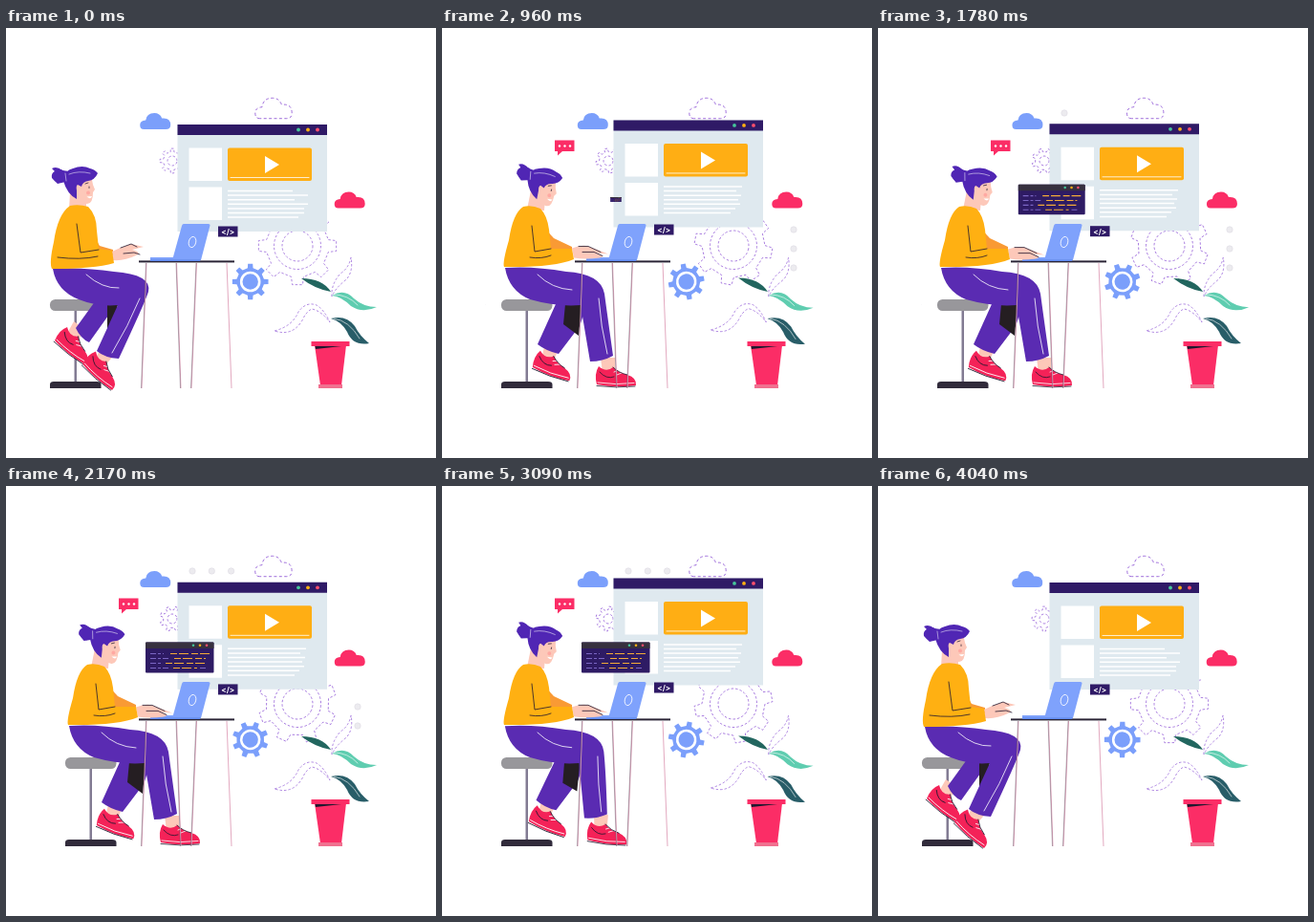
An HTML page for the animation above (4.08 s loop, 450 px wide and 450 px high).

```html
<!DOCTYPE html>
<html lang="en">
<head>
<meta charset="utf-8">
<title>Developer at work</title>
<style>
html, body { margin: 0; width: 100%; height: 100%; overflow: hidden; background: #fff; }
svg { display: block; width: 100vw; height: 100vh; }
.hair { fill: #5026b4; }
.skin { fill: #fdc8b9; }
.pants { fill: #5a2bb2; }
.shirt { fill: #ffb012; }
.pink { fill: #fb2d66; }
.dark { fill: #2f1a66; }
.ink { fill: none; stroke: #21182f; stroke-width: .8; stroke-linecap: round; stroke-linejoin: round; }
.white { fill: none; stroke: #fff; stroke-width: .8; stroke-linecap: round; }
.faint { fill: #fff; stroke: #8f56d6; stroke-width: .7; stroke-dasharray: 2.5 2; }
.dot { fill: #ecebef; stroke: #dddbe2; stroke-width: .6; }
</style>
</head>
<body>
<svg viewBox="0 0 450 450">
  <defs>
    <path id="cloud" d="M-12 8.5Q-16 8.5-16 4Q-16-.5-10-1Q-9-8.5-1-8.5Q5-8.5 7-3Q16-4 16 4Q16 8.5 11 8.5Z"/>
    <g id="shoe">
      <path class="skin" d="M-16-18H-1V-2H-14Z"/>
      <path fill="#f42258" d="M-20 10Q-23-1-18-9Q-10-2-3-8Q3-2 12 0Q22 3 21 11Q0 14-20 10Z"/>
      <path class="white" d="M-19 8Q0 11 19 8.500M-2-3L3-5M1 0L6-2"/>
      <path class="ink" d="M-20 11.500Q0 14 20 12M-17-3Q-10 5-2 2M-3-8Q3-2 12 0"/>
    </g>
  </defs>

  <path id="gearS" class="faint"/>
  <g id="gearL" class="faint"><path/><circle r="24.500"/><circle r="16"/></g>
  <g id="gearB"><path fill="#7b9ffb"/><circle r="9.500" fill="none" stroke="#fff" stroke-width="2.600"/></g>

  <use id="cloudB" href="#cloud" fill="#7b9ffb"/>
  <use id="cloudW" href="#cloud" class="faint"/>
  <use id="cloudP" href="#cloud" class="pink"/>

  <g id="page">
    <path fill="#dfe9ef" d="M179.500 101H336V213H179.500Z"/>
    <path class="dark" d="M179.500 101H336V112H179.500Z"/>
    <circle cx="306" cy="106.500" r="1.900" fill="#45c69a"/>
    <circle cx="316" cy="106.500" r="1.900" fill="#ffb012"/>
    <circle cx="326" cy="106.500" r="1.900" fill="#ff4f6d"/>
    <path fill="#fff" d="M191.500 125.500H226V160H191.500ZM191.500 166.500H226V201H191.500Z"/>
    <rect x="232" y="125.500" width="88" height="34.500" rx="2" fill="#ffae14"/>
    <path fill="#fff" d="M271 134L286 143L271 152Z"/>
    <path class="white" d="M235 156.500H317"/>
    <path id="lines" class="white" style="stroke-width:1.500;stroke-linecap:butt"/>
  </g>
  <g id="chip">
    <rect x="222" y="207.500" width="20.500" height="11" class="dark"/>
    <text x="232.200" y="216" text-anchor="middle" font-family="Inter, sans-serif" font-size="8" font-weight="700" fill="#fff">&lt;/&gt;</text>
  </g>
  <g id="editor">
    <rect x="146" y="163.500" width="71.500" height="32" rx="1" fill="#2e1b64"/>
    <path fill="#37313f" d="M146 170V164.500Q146 163.500 147 163.500H216.500Q217.500 163.500 217.500 164.500V170Z"/>
    <circle cx="196" cy="166.800" r="1.300" fill="#45c69a"/>
    <circle cx="203" cy="166.800" r="1.300" fill="#ffb012"/>
    <circle cx="210" cy="166.800" r="1.300" fill="#ff4f6d"/>
    <g fill="none" stroke-width="1.200">
      <path stroke="#f3ab38" stroke-dasharray="7 2 10 3" d="M172 175.500H213M176 180.500H209M167 185.500H211M175 190.500H200"/>
      <path stroke="#7b66c4" stroke-dasharray="6 2 3 2" d="M151 175.500H165M151 180.500H170M151 185.500H163M151 190.500H170M203 190.500H210"/>
    </g>
  </g>
  <g id="bubble">
    <path class="pink" d="M118 117.500H138.500V129H126L121 133.500V129H118Z"/>
    <g id="bubbleDots" fill="#fff"><circle cx="123" cy="123.500" r="1.200"/><circle cx="128.500" cy="123.500" r="1.200"/><circle cx="134" cy="123.500" r="1.200"/></g>
  </g>
  <g id="dots"></g>

  <g id="plant">
    <path class="faint" d="M281 317Q300 312 306 297Q314 286 325 290Q333 295 339 308Q330 296 320 294Q314 297 310 306Q300 323 281 317Z"/>
    <path class="faint" d="M341 281Q340 268 350 257Q359 251 361 240Q364 257 354 265Q345 272 341 281Z"/>
    <path fill="#22665f" d="M309 262Q331 262 340 276Q323 273 309 262Z"/>
    <path fill="#5fcdb0" d="M341 280Q354 272 364 283Q374 292 388 292Q373 299 361 291Q351 281 341 280Z"/>
    <path fill="#285d68" d="M340 304Q356 300 365 312Q370 322 380 330Q363 333 357 318Q351 307 340 304Z"/>
    <path class="white" style="stroke-width:.6" d="M343 279Q358 279 368 290M343 304Q359 306 370 325"/>
  </g>
  <path class="pink" d="M323 332H356L351 374H329Z"/>
  <path fill="#21182f" d="M323.500 333H351L324 336Z"/>
  <rect x="319.500" y="328" width="40" height="5" class="pink"/>
  <rect x="327" y="373" width="25" height="4" fill="#f0708f"/>

  <g id="stool">
    <rect x="71.500" y="294" width="2.500" height="78" fill="#827b93"/>
    <rect x="46" y="284" width="53.500" height="12" rx="5.500" fill="#98979b"/>
    <path fill="#312b3b" d="M46 377V373Q46 370 50 370H95Q99.500 370 99.500 373V377Z"/>
  </g>
  <use id="shoeFar" href="#shoe"/>
  <path id="legFar" class="pants"/>
  <path id="shade" fill="#251e22"/>
  <use id="shoeNear" href="#shoe"/>
  <path id="legNear" class="pants"/>
  <path id="seam" class="white"/>

  <path fill="none" stroke="#e3a9c0" d="M147 246L142 377M178.500 246L183 377M199.500 246L194 377M231 246L236 377"/>
  <path fill="none" stroke="#4a3d50" stroke-width=".4" d="M146.500 246L141.500 377M178 246L182.500 377M199 246L193.500 377"/>
  <rect x="139" y="243.400" width="100" height="2" fill="#2a2435"/>
  <path fill="#7fa2fc" d="M186 205H211.500Q214 205 213.400 207L204 243H174L184 207Q184.500 205 186 205ZM151 240H176V244H151Z"/>
  <path fill="#5f89ee" d="M151 242.500H203.500L203 244H151Z"/>
  <ellipse cx="195" cy="224" rx="3.700" ry="5.700" transform="rotate(14 195 224)" fill="none" stroke="#fff" stroke-width=".8"/>

  <path id="sleeve" fill="#f99a34"/>
  <g id="hands"><path id="hand" class="skin"/><path id="fingers" class="ink"/></g>
  <path id="neck" class="skin"/>
  <path id="torso" class="shirt"/>
  <path id="folds" class="ink"/>
  <g id="head">
    <path class="skin" d="M70 162L89 154L91 164L93 169L91 172Q91 184 85 184Q77 183 71 179Z"/>
    <circle cx="86" cy="172.500" r="2" fill="#ffa9a2"/>
    <path fill="#fff" d="M84.500 176.500L90 176Q89 180 84.500 176.500Z"/>
    <path class="ink" style="stroke-width:.7" d="M83 163L86 162M87 166V167.500"/>
    <path class="hair" d="M60 160Q61 149 70 147Q80 143 88 147Q93 148 96 152Q93 159 86 160Q80 161 79 166L75 164Q73 165 74 170L74 179Q64 174 60 160Z"/>
    <circle cx="56" cy="155" r="7" class="hair"/>
    <path class="hair" d="M59 149Q53 144 48 147L51 150Q47 152 48 157L54 163L66 160V150Z"/>
    <path class="white" style="stroke-width:.5" d="M66 153Q76 149 88 152M62 152L63 160"/>
    <path class="skin" d="M74 165Q79 165 78 171Q75 172 74 168Z"/>
  </g>
</svg>
<script>
const LOOP = 4080;
const el = id => document.getElementById(id);
const set = (id, name, value) => el(id).setAttribute(name, value);
const move = (id, value) => set(id, 'transform', value);
const clamp = x => Math.min(1, Math.max(0, x));
const ease = u => u < .5 ? 4 * u ** 3 : 1 - 4 * (1 - u) ** 3;
const ramp = (t, a, b) => ease(clamp((t - a) / (b - a)));
const hold = (t, a, b, c, d) => ramp(t, a, b) - ramp(t, c, d);
const lerp = (a, b, k) => a + (b - a) * k;

// Blends two paths that share the same commands.
function blend([from, to], k) {
  const goal = to.match(/-?[\d.]+/g);
  let i = 0;
  return from.replace(/-?[\d.]+/g, n => lerp(+n, +goal[i++], k).toFixed(2));
}

function gear(outer, inner) {
  const points = [];
  for (let i = 0; i < 8; i++)
    for (const [r, turn] of [[inner, -.25], [outer, -.17], [outer, .17], [inner, .25]]) {
      const a = (i + turn) * Math.PI / 4;
      points.push((r * Math.cos(a)).toFixed(2) + ' ' + (r * Math.sin(a)).toFixed(2));
    }
  return 'M' + points.join('L') + 'Z';
}

// Each pair: leaning back, then reaching for the keyboard.
const legs = {
  legFar: ['M78 262L125 262Q128 285 112 294L87 329Q78 325 73 314L94 285Z',
           'M94 262L150 262Q154 285 144 312L122 341Q109 338 100 331L119 289Z'],
  shade: ['M106 290L117 288L115 304L106 315Z',
          'M129 289L146 289L143 322L127 310Z'],
  legNear: ['M49 252Q80 250 113 255Q153 258 149 276Q146 286 118 346Q103 345 95 338L117 290Q96 292 76 284Q53 275 49 252Z',
            'M66 251Q96 249 130 255Q166 257 170 278Q173 300 179 343Q168 349 155 349L145 290Q120 292 92 284Q70 275 66 251Z'],
  seam: ['M84 258Q101 273 118 272M140 283Q128 312 111 340', 'M100 258Q115 273 136 274M164 283Q166 312 173 341']
};
const body = {
  sleeve: ['M90 214L98 228L112 232L112 238L90 238Z', 'M106 208L117 220L136 229L136 236L108 236Z'],
  neck: ['M67 172L84 178L84 190L66 190Z', 'M93 170L108 178L107 191L89 190Z'],
  torso: ['M67 186Q76 184 86 187Q95 196 95 212L97 231L111 233L113 246Q92 252 48 252Q45 246 50 224Q54 195 67 186Z',
          'M85 187Q94 185 103 189Q110 196 112 211L114 231L136 231L138 242Q116 251 65 250Q63 246 70 222Q74 194 85 187Z'],
  folds: ['M74 205L78 235L97 232M54 240Q78 243 96 239', 'M94 207L97 234L114 231M92 240Q104 242 114 238'],
  hand: ['M111 234Q121 229 131 226L144 229L132 232Q143 235 136 238Q124 244 112 243Z',
         'M136 231Q146 227 153 229L174 237L160 236Q173 239 165 241Q150 243 138 241Z'],
  fingers: ['M120 230L131 226L137 229M123 236L134 235L140 237', 'M143 229L153 229L166 235M147 235L159 235L168 239']
};
const rows = [[68, 82], [84, 76], [70, 81], [84, 78], [80, 80], [80, 75], [74, 70]];

const dots = [];
function addDot(x, y, ...times) {
  const c = document.createElementNS('http://www.w3.org/2000/svg', 'circle');
  c.setAttribute('class', 'dot');
  c.setAttribute('cx', x);
  c.setAttribute('cy', y);
  el('dots').append(c);
  dots.push([c, times]);
}
for (let i = 0; i < 3; i++) {
  addDot(368, 211 + 20 * i, 180 + 170 * i, 360 + 170 * i, 1950 + 280 * i, 2130 + 280 * i);
  addDot(195 + 20.3 * i, 89, 1600 + 170 * i, 1780 + 170 * i, 3740 - 180 * i, 3860 - 180 * i);
}

set('gearS', 'd', gear(13, 9.5) + 'M5 0A5 5 0 1 0-5 0A5 5 0 1 0 5 0Z');
el('gearL').firstChild.setAttribute('d', gear(41, 33));
el('gearB').firstChild.setAttribute('d', gear(19, 14.5));

function draw(t) {
  const c = Math.cos(t / LOOP * 4 * Math.PI);
  const lean = hold(t, 60, 620, 3180, 3880);
  const reach = hold(t, 90, 660, 2870, 3550);
  const slide = 16 * lean;
  const spin = t / LOOP * 45;

  move('page', `translate(0 ${2.3 * c - 2.3})`);
  move('chip', `translate(0 ${c - 1})`);
  move('cloudB', `translate(${157 - .8 * c} 97.500)`);
  move('cloudW', `translate(${279 + c} 84) scale(1.2 1.26)`);
  move('cloudP', `translate(${360.5 - .8 * c} 180)`);
  move('gearS', `translate(174 139) rotate(${-spin})`);
  move('gearL', `translate(305 228) rotate(${spin})`);
  move('gearB', `translate(255.700 265.500) rotate(${-spin})`);
  move('plant', `rotate(${.5 - .5 * c} 340 327)`);
  set('lines', 'd', rows.map(([a, b], i) =>
    `M232 ${170.5 + i * 4.6}h${lerp(a, b, lean)}`).join(''));

  move('stool', `translate(${slide} 0)`);
  for (const id in legs) {
    set(id, 'd', blend(legs[id], reach));
    move(id, `translate(${slide - 16 * reach} 0)`);
  }
  const shoe = (id, x, y, a, x2, y2, a2) => move(id,
    `translate(${lerp(x, x2 - 16, reach) + slide} ${lerp(y, y2, reach)}) rotate(${lerp(a, a2, reach)})`);
  shoe('shoeFar', 73, 331, 37, 117, 352, 19);
  shoe('shoeNear', 102, 357, 40, 182, 363, 0);

  for (const id in body) set(id, 'd', blend(body[id], lean));
  move('hands', `translate(0 ${.6 * Math.sin(t / LOOP * 24 * Math.PI) * lean})`);
  move('head', `translate(${26.5 * lean} ${1.5 * lean}) rotate(${lean * (8.5 - 3 * c)} 80 172)`);

  const pop = hold(t, 280, 470, 3340, 3570);
  move('bubble', `translate(118 133) scale(${pop}) translate(-118 -133)`);
  set('bubbleDots', 'opacity', hold(t, 520, 760, 3200, 3350));
  const grow = .96 * ramp(t, 780, 1300) + .04 * ramp(t, 1300, 2300) - ramp(t, 3540, 3920);
  move('editor', `translate(182 179.500) scale(${Math.max(0, grow)}) translate(-182 -179.500)`);
  for (const [dot, times] of dots) {
    const size = hold(t, ...times);
    dot.setAttribute('r', 3.2 * size);
    dot.setAttribute('opacity', size);
  }
}

const start = performance.now();
function tick() {
  draw((performance.now() - start) % LOOP);
  requestAnimationFrame(tick);
}
draw(0);
tick();
</script>
</body>
</html>
```
